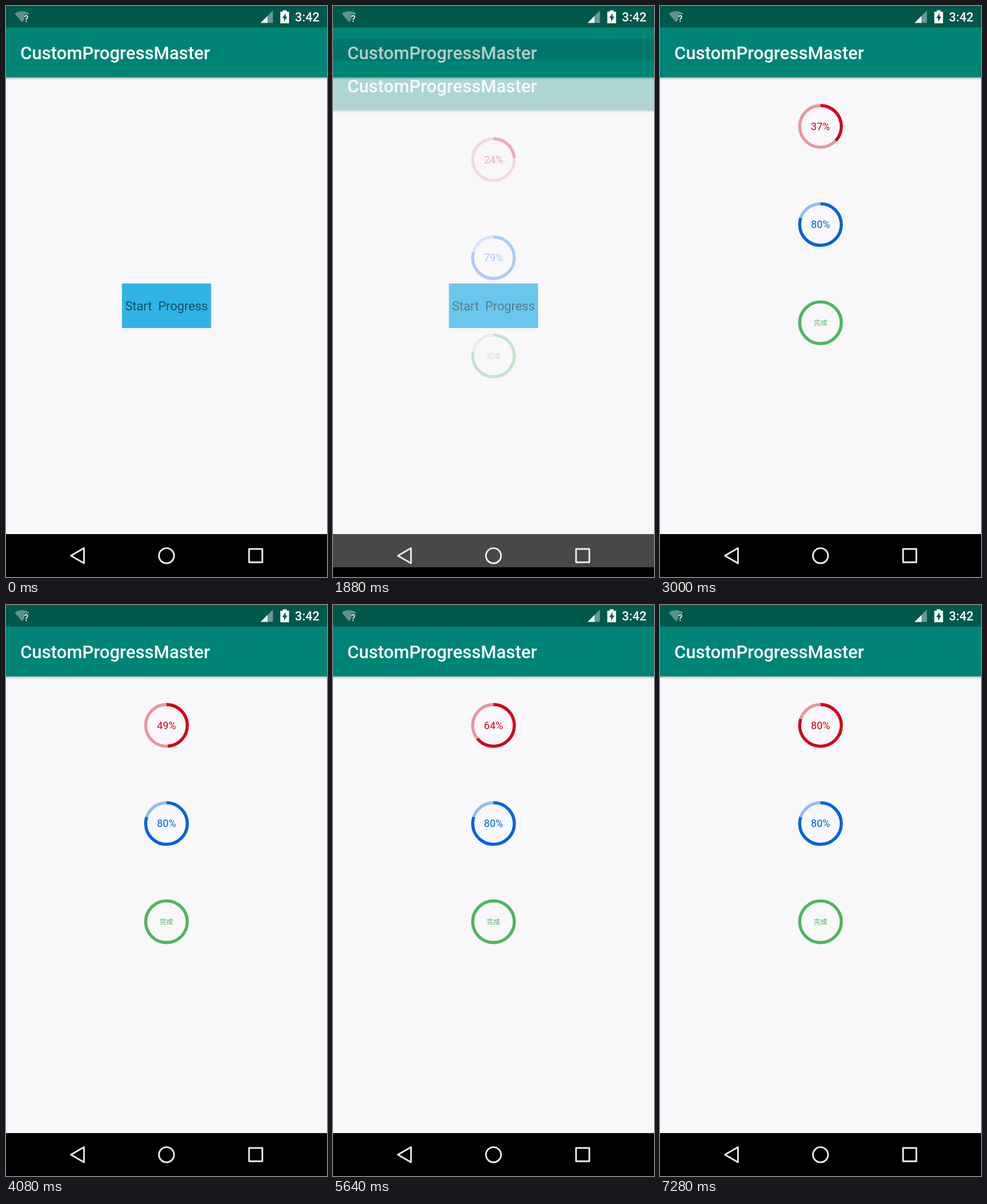
These frames come from a looping animation (561x998 px, 7520 ms). An HTML page:

```html
<!DOCTYPE html>
<html lang="en">
<head>
<meta charset="utf-8">
<title>Progress rings</title>
<style>
  html, body { margin: 0; width: 100%; height: 100%; overflow: hidden; background: #f8f7fa; }
  svg { display: block; width: 100%; height: 100%; }
  text { font-family: Roboto, "Noto Sans CJK SC", "Noto Sans CJK", sans-serif; white-space: pre; }
  .title { font-size: 31.1px; font-weight: 500; fill: #fff; }
  .mid { text-anchor: middle; }
</style>
</head>
<body>
<svg viewBox="0 0 561 998">
  <defs>
    <linearGradient id="shade" x2="0" y2="1">
      <stop stop-color="#000" stop-opacity=".3"/>
      <stop offset=".45" stop-color="#000" stop-opacity=".1"/>
      <stop offset="1" stop-color="#000" stop-opacity="0"/>
    </linearGradient>
    <g id="page">
      <rect width="561" height="923" fill="#f8f7fa"/>
      <rect width="561" height="38" fill="#00574b"/>
      <rect y="37.5" width="561" height="87.3" fill="#008476"/>
      <rect y="124.8" width="561" height="5" fill="url(#shade)"/>
      <text class="title" x="24.9" y="93">CustomProgressMaster</text>
    </g>
  </defs>

  <rect width="561" height="998"/>

  <g id="start">
    <use href="#page"/>
    <rect x="202.6" y="485" width="155.8" height="77.8" fill="#30b2e4"/>
    <text class="mid" x="280.5" y="532.3" font-size="21.8" fill-opacity=".57">Start&#160; Progress</text>
  </g>

  <g id="rings"><use href="#page"/></g>

  <g id="status" fill="#fff">
    <path d="M28 28.5 L15.3 13.2 Q28 4.8 40.8 13.2 L39.5 14.8 H32 V23.7 Z" opacity=".36"/>
    <text x="31.6" y="27.6" font-size="16" font-weight="500">?</text>
    <path d="M445 29.5 L466.5 8 V29.5 Z" opacity=".4"/>
    <path d="M445 29.5 L457 17.5 V29.5 Z"/>
    <path d="M483.6 7.6 H490.4 V10 H494.6 V30.2 H479.4 V10 H483.6 Z"/>
    <path d="M488.5 12.5 L482.8 21.3 H486 V27.6 L491.6 18.6 H488.5 Z" fill="#00574b"/>
    <text x="505" y="27" font-size="21.8" font-weight="500">3:42</text>
  </g>

  <g fill="none" stroke="#ececec" stroke-width="2.9" stroke-linejoin="round">
    <path d="M113.5 960.8 L136.3 947.6 V974 Z"/>
    <circle cx="280.5" cy="960.8" r="13.2"/>
    <rect x="424.8" y="949" width="23.2" height="23.2"/>
  </g>
</svg>
<script>
const LOOP = 7520, OPEN = 1880, SETTLED = 2200;
const TICKS = [0, 1880, 2200, 2440, 2760, 2960, 3200, 3480, 3800, 4080, 4400, 4600, 4920,
  5120, 5400, 5640, 5920, 6160, 6440, 6760, 7040, 7280];
const NS = "http://www.w3.org/2000/svg";
const start = document.getElementById("start");
const rings = document.getElementById("rings");

function add(parent, tag, attrs) {
  const el = document.createElementNS(NS, tag);
  for (const key in attrs) el.setAttribute(key, attrs[key]);
  return parent.appendChild(el);
}

function makeRing(y, color, fontSize, baseline) {
  const g = add(rings, "g", { transform: `translate(280.5 ${y})` });
  const base = { r: 36.4, fill: "none", stroke: color, "stroke-width": 5.3 };
  add(g, "circle", { ...base, "stroke-opacity": .4 });
  const arc = add(g, "circle", { ...base, pathLength: 100, transform: "rotate(-90)" });
  const label = add(g, "text", { class: "mid", y: baseline, "font-size": fontSize, fill: color });
  return (value, text = value + "%") => {
    arc.setAttribute("stroke-dasharray", value >= 100 ? "none" : `${value} 100`);
    label.textContent = text;
  };
}

const red = makeRing(210.4, "#d0021b", 18, 6.3);
const blue = makeRing(382, "#0262de", 18, 6.3);
const green = makeRing(553.6, "#50b45f", 11.7, 4.5);

function draw(time) {
  const t = TICKS.filter(tick => tick <= time).pop();
  const opening = t >= OPEN && t < SETTLED;

  start.style.display = t < SETTLED ? "" : "none";
  rings.style.display = t < OPEN ? "none" : "";
  rings.setAttribute("opacity", opening ? .29 : 1);
  rings.setAttribute("transform", `translate(0 ${opening ? 58 : 0})`);

  red(opening ? 24 : Math.min(80, Math.round(30 + (t - SETTLED) * .00985)));
  blue(opening ? 79 : 80);
  green(Math.min(100, 78 + (t - OPEN) * 18 / 320), "完成");
}

function frame() {
  draw(performance.now() % LOOP);
  requestAnimationFrame(frame);
}
frame();
</script>
</body>
</html>
```
